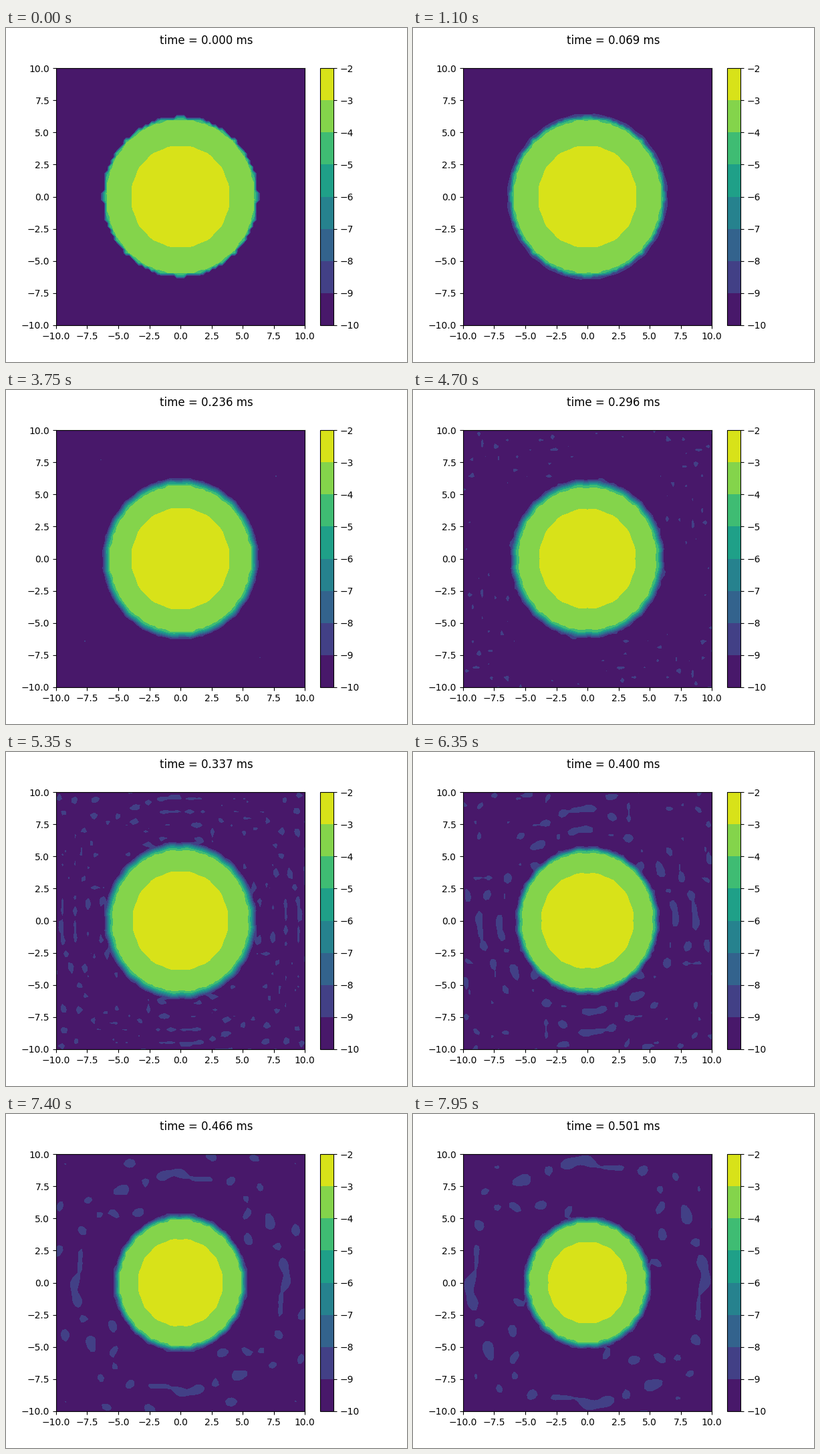
Write a matplotlib script that moves like this. It is 600 by 500 pixels and loops after 8000 ms.

```python
import numpy as np
import matplotlib.pyplot as plt
from matplotlib.animation import FuncAnimation

FRAMES, INTERVAL = 160, 50
DT = 0.003151            # ms of simulated time per frame
FLOOR = -10.0
LEVELS = np.arange(-10, -1)

# Radii of the -3, -4 and -9 levels over time
TIMES = [0, .02, .08, .142, .236, .337, .400, .432, .501]
R3 = [3.95, 3.95, 3.95, 3.95, 3.93, 3.83, 3.71, 3.61, 3.17]
R4 = [5.98, 5.97, 5.92, 5.83, 5.70, 5.53, 5.35, 5.16, 4.68]
R9 = [6.35, 6.50, 6.50, 6.40, 6.22, 6.08, 5.72, 5.52, 5.10]

axis = np.linspace(-10, 10, 79)
step = axis[1] - axis[0]
X, Y = np.meshgrid(axis, axis)
R = np.hypot(X, Y)
THETA = np.arctan2(Y, X)
CLOUD_R = step * np.sqrt(579)

# Slightly faceted outlines
INNER_WIGGLE = 0.035 * np.cos(16 * THETA) + 0.02 * np.cos(4 * THETA)
EDGE_WIGGLE = 0.025 * np.cos(20 * THETA) + 0.025 * np.sin(28 * THETA + 1)

# Angle from the nearest half axis, and how near to it
OFF_AXIS = (THETA - 0.05 + np.pi / 4) % (np.pi / 2) - np.pi / 4
NEAR_AXIS = np.exp(-(OFF_AXIS / 0.27) ** 2)

rng = np.random.default_rng(12)
WAVES = 14
WAVE_DIR = rng.uniform(0, np.pi / 2, WAVES)
WAVE_LEN = rng.uniform(0.8, 1.35, WAVES)


def at(t, values):
    return np.interp(t, TIMES, values)


def parabola(r, r3, r4):
    """Log of an inverted parabola that passes -3 at r3 and -4 at r4."""
    top = (10 * r4 ** 2 - r3 ** 2) / 9
    return np.log10(1e-3 * np.maximum(top - r ** 2, 0.05) / (top - r3 ** 2))


def cloud(t):
    r3, r4, r9 = at(t, R3), at(t, R4), at(t, R9)
    s = np.clip((R - r3) / (r4 - r3), 0, 1)
    r = R + (1 - s) * INNER_WIGGLE + s * EDGE_WIGGLE
    edge = -4 - 5 * (r - r4) / (r9 - r4)
    soft = np.where(r < r4, parabola(r, r3, r4), edge)
    hard = np.where(R < CLOUD_R, parabola(r, R3[0], R4[0]), FLOOR)
    w = 1 - np.exp(-t / 0.08)
    return (1 - w) * hard + w * np.maximum(soft, FLOOR)


def speckle(size):
    """Random standing waves with fourfold symmetry."""
    total = np.zeros_like(X)
    for angle, length in zip(WAVE_DIR, WAVE_LEN):
        k = 2 * np.pi / (size * length)
        c, s = k * np.cos(angle), k * np.sin(angle)
        total += np.cos(c * X + s * Y) + np.cos(c * Y - s * X)
    return total / np.sqrt(WAVES)


def ripples(t):
    if t < 0.205:
        return np.full_like(X, FLOOR)
    size = max(0.6, 1.3 * (t / 0.4) ** 1.4)
    keys = [.22, .337, .400, .432, .501]
    start = np.interp(t, keys, [5.8, 6.5, 7.1, 7.4, 9.3])
    gap = np.interp(t, keys, [0.6, 1.03, 1.6, 2.1, 3.0])
    bend = np.interp(t, keys, [0, 0.5, 3, 3, 3])
    gain = np.clip((t - 0.24) / 0.09, 0, 1)
    arcs = np.cos(2 * np.pi * (R + bend * OFF_AXIS ** 2 - start) / gap)
    rings = np.cos(2 * np.pi * (R - start) / size)
    field = (speckle(size) * (1 - 0.6 * NEAR_AXIS)
             + gain * (1.6 * NEAR_AXIS * arcs
                       + 0.6 * (1 - NEAR_AXIS) * rings))
    limit = np.interp(t, [.205, .217, .236, .30, .337],
                      [9, 3.3, 2.8, 1.7, 1.4])
    return np.clip(-9 + 0.5 * (field - limit), FLOOR, -8.1)


def density(t):
    return np.clip(np.maximum(cloud(t), ripples(t)), FLOOR + 0.01, -2.01)


fig, ax = plt.subplots(figsize=(6, 5), dpi=100)
title = fig.suptitle("")
current = [ax.contourf(X, Y, density(0), levels=LEVELS)]
fig.colorbar(current[0], ax=ax)


def init():
    return []


def update(i):
    t = i * DT
    current[0].remove()
    current[0] = ax.contourf(X, Y, density(t), levels=LEVELS)
    title.set_text(f"time = {t:.3f} ms")
    return [current[0], title]


anim = FuncAnimation(fig, update, frames=FRAMES, interval=INTERVAL,
                     init_func=init, repeat=True, repeat_delay=0, blit=False)
plt.show()
```
